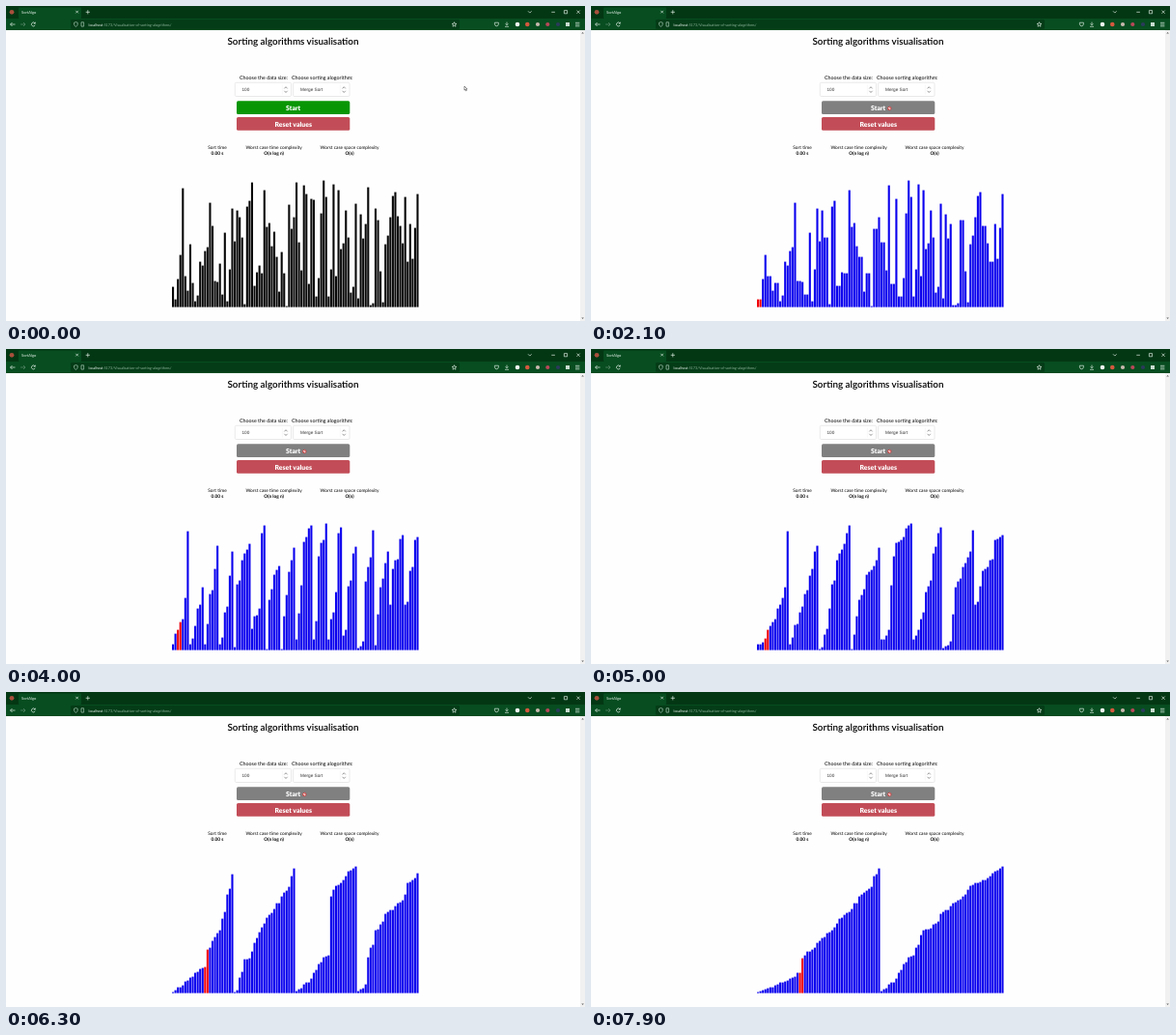
Write an HTML page that moves like this. It is 600 by 326 pixels and loops after 8000 ms.

```html
<!DOCTYPE html>
<html lang="en">
<head>
<meta charset="utf-8">
<title>Sorting algorithms visualisation</title>
<style>
html, body { margin: 0; width: 100%; height: 100%; overflow: hidden; background: #fefefe; }
svg { display: block; width: 100vw; height: 100vh; }
text { font-family: Lato, sans-serif; text-rendering: geometricPrecision; }
.mid { text-anchor: middle; }
.line { fill: none; stroke: #dfeee3; stroke-width: .7; }
.field { fill: #fff; stroke: #dcdcdc; stroke-width: .6; }
.value { font: 4.7px "Liberation Sans", Arial, sans-serif; fill: #333; }
.button { font-size: 6.9px; font-weight: 900; fill: #fff; }
.stats { font-size: 4.8px; }
.stats .strong { font-weight: 700; }
</style>
</head>
<body>
<svg viewBox="0 0 600 326">
  <!-- browser window -->
  <rect width="600" height="13" fill="#033714"/>
  <rect y="13" width="600" height="12" fill="#074d20"/>
  <rect x="13" y="1.5" width="65" height="11.5" rx="1" fill="#074d20"/>
  <rect x="67" y="14" width="403" height="10" rx="1.2" fill="#043c17"/>
  <circle cx="6" cy="6.3" r="2.4" fill="#a8503c"/>
  <text x="16" y="8" font-size="4" fill="#e6f2e9">SortAlgo</text>
  <text x="85.5" y="20.6" font-size="3.8" fill="#8fb59b"><tspan fill="#f2faf4">localhost</tspan>:5173/Visualisation-of-sorting-alogrithms/</text>
  <g class="line">
    <path d="M72.3 4.8l2.6 2.6m0-2.6l-2.6 2.6M84.8 4.2v4.2m-2.1-2.1h4.2"/>
    <path d="M541 5.3l1.8 1.8 1.8-1.8M565.3 6.3h3.6M578.4 4.6h3.2v3.2h-3.2zM591.5 4.6l3.2 3.2m0-3.2l-3.2 3.2"/>
    <path d="M9.5 19h-5m2-2l-2 2 2 2"/>
    <path d="M15 19h5m-2-2l2 2-2 2" stroke="#5f8f70"/>
    <path d="M30 17.8a2 2 0 1 0 .2 2M30.3 16.6v1.6h-1.6"/>
    <path d="M70.6 17.2l1.8-.6 1.8 .6v2q-.4 1.6-1.8 2.2-1.4-.6-1.8-2.2zM78 16.8h2.6v4.3h-2.6z" stroke="#a9c9b3"/>
    <path d="M464.5 16.7l.7 1.6 1.7 .1-1.3 1.1 .4 1.7-1.5-.9-1.5 .9 .4-1.7-1.3-1.1 1.7-.1z"/>
    <path d="M506.4 17.2h4v1.6q-.4 2-2 2-1.6 0-2-2zM519 16.6v3m-1.4-1.2l1.4 1.4 1.4-1.4M517 21.3h4"/>
    <path d="M590 17.3h4.4m-4.4 1.8h4.4m-4.4 1.8h4.4"/>
  </g>
  <circle cx="530" cy="19" r="2.3" fill="#f1f5f2"/>
  <circle cx="540.3" cy="19" r="2.3" fill="#d5583f"/>
  <circle cx="551" cy="19" r="2.1" fill="#c9b8ae"/>
  <circle cx="561.3" cy="19" r="2.1" fill="#b9485a"/>
  <circle cx="572" cy="19" r="2.1" fill="#2b3a5c"/>
  <rect x="580" y="17" width="4" height="4" fill="#c8dccf"/>

  <!-- page scrollbar -->
  <rect x="595" y="25" width="5" height="301" fill="#f1f1f1"/>
  <path d="M596.3 28.6l1.3-1.6 1.3 1.6zM596.3 322.4l1.3 1.6 1.3-1.6z" fill="#666"/>

  <!-- controls -->
  <text class="mid" x="297.5" y="39.8" font-size="9.9" font-weight="600">Sorting algorithms visualisation</text>
  <text x="242" y="76.4" font-size="5.35">Choose the data size:</text>
  <text x="296" y="76.4" font-size="5.35">Choose sorting alogorithm:</text>
  <rect class="field" x="237.3" y="79.3" width="58.2" height="14.2" rx="1.2"/>
  <rect class="field" x="297.6" y="79.3" width="58.4" height="14.2" rx="1.2"/>
  <text class="value" x="244.5" y="88.2">100</text>
  <text class="value" x="305" y="88.2">Merge Sort</text>
  <path d="M288.4 85.4l1.6-1.7 1.6 1.7m-3.2 2.4l1.6 1.7 1.6-1.7M348.6 85.4l1.6-1.7 1.6 1.7m-3.2 2.4l1.6 1.7 1.6-1.7" fill="none" stroke="#555" stroke-width=".6"/>
  <path d="M286.3 81.5v10M346.3 81.5v10" stroke="#eee" stroke-width=".5"/>
  <rect id="start" x="239" y="98.3" width="117.3" height="13.8" rx="1.6"/>
  <text class="mid button" x="297.7" y="107.8">Start</text>
  <rect x="239" y="115" width="117.3" height="13.8" rx="1.6" fill="#c24d58"/>
  <text class="mid button" x="297.7" y="124.5">Reset values</text>

  <g class="mid stats">
    <text x="219" y="148.2">Sort time</text>
    <text x="277.6" y="148.2">Worst case time complexity</text>
    <text x="356" y="148.2">Worst case space complexity</text>
    <text class="strong" x="219" y="154">0.00 s</text>
    <text class="strong" x="277.6" y="154">O(n log n)</text>
    <text class="strong" x="356" y="154">O(n)</text>
  </g>

  <g id="bars"></g>
  <path id="arrow" d="M0 0v4.2l1-.9 .7 1.5 .7-.4-.7-1.4h1.3z" fill="#fff" stroke="#222" stroke-width=".5"/>
  <g id="blocked" transform="translate(309.3 106)">
    <circle r="1.7" fill="#fff" stroke="#c92a2a" stroke-width=".8"/>
    <path d="M-1.1 1.1l2.2-2.2" stroke="#c92a2a" stroke-width=".7"/>
  </g>
</svg>
<script>
const LOOP = 8000, TICK = 100, SORT_START = 1800;
const BASE = 311.6, LEFT = 172, PITCH = 2.56;

const heights = [
  21, 8, 29, 54, 123, 32, 17, 65, 25, 6, 12, 47, 43, 58, 62, 108, 84, 27, 26, 45,
  13, 77, 6, 39, 102, 68, 100, 93, 72, 3, 104, 110, 129, 22, 36, 43, 35, 121, 83, 87,
  63, 78, 52, 16, 57, 35, 1, 106, 81, 93, 129, 67, 38, 126, 117, 24, 112, 111, 11, 30,
  97, 131, 114, 11, 39, 127, 32, 121, 60, 66, 100, 72, 15, 21, 107, 9, 96, 71, 86, 124,
  2, 4, 102, 90, 37, 5, 65, 74, 93, 115, 119, 94, 84, 66, 114, 47, 86, 50, 82, 117
];

// All merges of one recursion depth advance together; deepest comes first.
const stageStarts = [1800, 2200, 2907, 3893, 4816, 5836, 7436, 9936];
const markerLead = [0, 0, 1, 2, 0, 0, 0];
const stages = stageStarts.slice(1).map(() => []);

function split(lo, hi, depth) {
  if (lo >= hi) return;
  const mid = (lo + hi) >> 1;
  split(lo, mid, depth + 1);
  split(mid + 1, hi, depth + 1);
  stages[stages.length - 1 - depth].push([lo, hi]);
}
split(0, heights.length - 1, 0);

function sortState(time) {
  const values = [...heights];
  let marker = -2;
  stages.forEach((segments, s) => {
    if (time < stageStarts[s]) return;
    const [first, last] = segments[0];
    const step = (stageStarts[s + 1] - stageStarts[s]) / (last - first + 1);
    const written = Math.floor((time - stageStarts[s]) / step);
    for (const [lo, hi] of segments) {
      const merged = values.slice(lo, hi + 1).sort((a, b) => a - b).slice(0, written);
      merged.forEach((value, k) => { values[lo + k] = value; });
    }
    marker = Math.max(0, Math.min(last - 1, written - 1 + markerLead[s]));
  });
  return { values, marker };
}

const byId = id => document.getElementById(id);
const bars = heights.map((_, i) => {
  const bar = document.createElementNS("http://www.w3.org/2000/svg", "rect");
  bar.setAttribute("x", LEFT + i * PITCH);
  bar.setAttribute("width", 2.1);
  return byId("bars").appendChild(bar);
});

function pointer(time) {
  if (time >= 1400) return [308.5, 104.5];
  const p = Math.max(0, Math.min(1, (time - 300) / 900));
  const eased = p * p * (3 - 2 * p);
  return [475 - 129 * eased, 83 + 22.5 * eased];
}

function draw(time) {
  const sorting = time >= SORT_START;
  const { values, marker } = sortState(time);
  bars.forEach((bar, i) => {
    const active = i === marker || i === marker + 1;
    bar.setAttribute("y", BASE - values[i]);
    bar.setAttribute("height", values[i]);
    bar.setAttribute("fill", !sorting ? "#080808" : active ? "#f00008" : "#0a00ee");
  });
  byId("start").setAttribute("fill", sorting ? "#808080" : "#099605");
  byId("arrow").setAttribute("transform", `translate(${pointer(time)})`);
  byId("arrow").style.display = sorting ? "none" : "";
  byId("blocked").style.display = sorting ? "" : "none";
}

const origin = performance.now();
function frame() {
  const elapsed = (performance.now() - origin) % LOOP;
  draw(Math.floor(elapsed / TICK) * TICK);
  requestAnimationFrame(frame);
}
frame();
</script>
</body>
</html>
```
